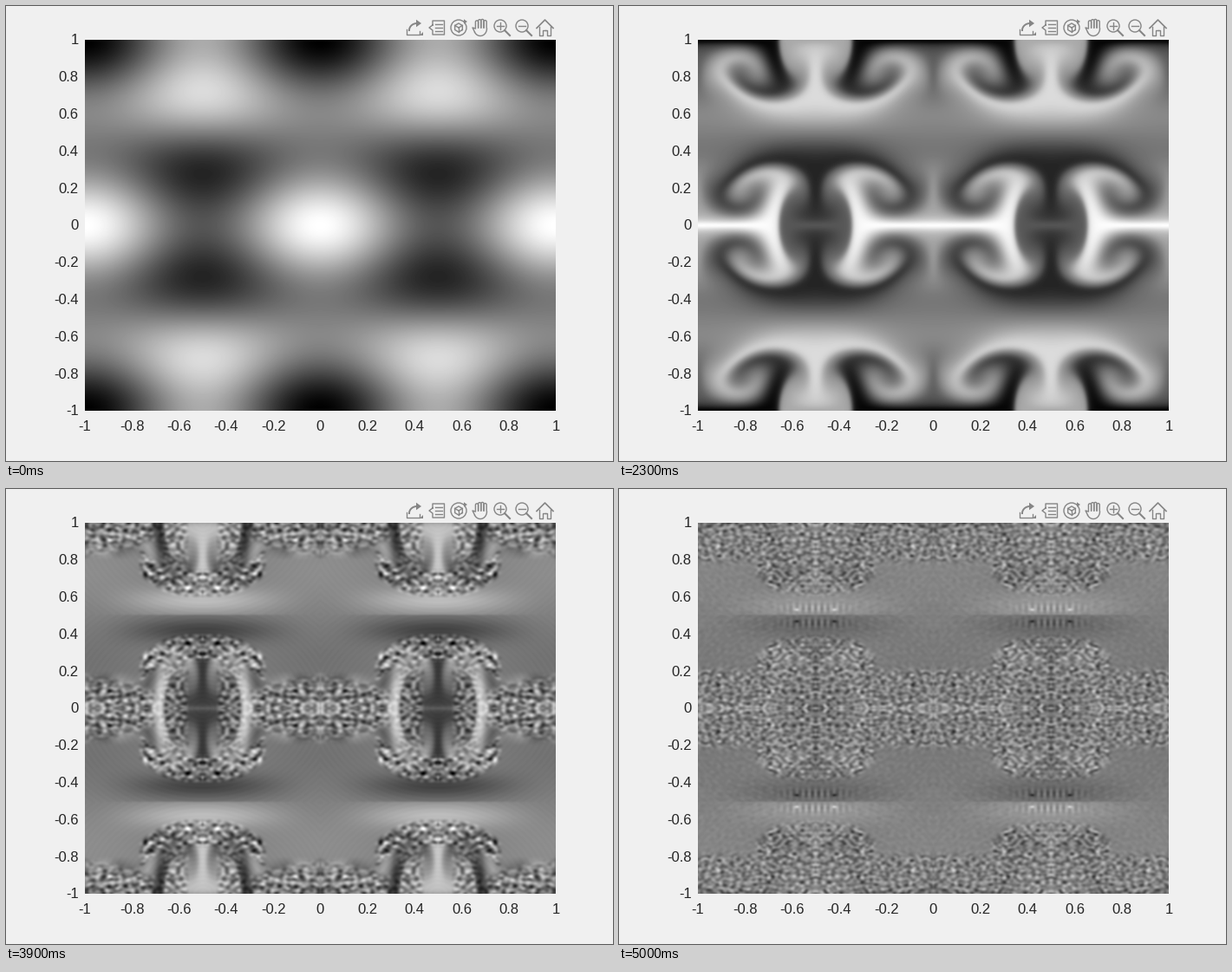
Recreate the animation shown at these times as a matplotlib script. Size 700 by 525 pixels, loop 5.1 s.

```python
import numpy as np
import matplotlib.pyplot as plt
from matplotlib.animation import FuncAnimation
from matplotlib.patches import Circle, Polygon

W, H, DPI = 700, 525, 100
FRAMES, INTERVAL = 51, 100
LEFT, RIGHT, TOP, BOTTOM = 91, 634, 39, 467
PAPER, INK, ICON = "#f0f0f0", "#262626", "#858585"
TAU = 2 * np.pi
CELLS = 64          # grid cells along one symmetric quarter of a period
RATE = 0.04         # strain per frame
REACH = 0.28        # height where the flow fades out

plt.rcParams["font.family"] = "Liberation Sans"

side = np.linspace(0, 0.5, CELLS + 1)
X, Y = np.meshgrid(side, side)


def ramp(n, start, end):
    return float(np.clip((n - start) / (end - start), 0, 1))


def smooth(a):
    return a * a * (3 - 2 * a)


def bump(d, width):
    return np.exp(-(d / width) ** 2)


def inside(d, soft=0.03):
    return np.clip(0.5 + d / soft, 0, 1)


# ---- transported field ----

def start_field(x, y):
    return (2 * np.cos(TAU * x) * np.cos(np.pi * y) + np.cos(3 * np.pi * y)) / 3


def velocity(x, y, time):
    """Curl of a few stream function modes, damped away from y = 0."""
    boost = 1 - smooth(ramp(time, 10, 20))
    rate = RATE / TAU * (1 - 0.7 * ramp(time, 30, 34))
    modes = ((1, 1, 1 + boost), (2, 1, 0.155), (2, 2, 0.422), (3, 1, -0.5))
    psi = u = v = 0
    for m, k, amp in modes:
        sx, cx = np.sin(TAU * m * x), np.cos(TAU * m * x)
        sy, cy = np.sin(TAU * k * y), np.cos(TAU * k * y)
        psi = psi + amp * sx * sy / TAU
        u = u + k * amp * sx * cy
        v = v - m * amp * cx * sy
    damp = 1 / (1 + (y / REACH) ** 6)
    slope = -6 * damp ** 2 * (y / REACH) ** 5 / REACH
    return rate * (u * damp + psi * slope), rate * v * damp


def transported(n):
    """Follow every grid point back to its starting place."""
    x, y = X, Y
    for step in range(n, 0, -1):
        u, v = velocity(x, y, step)
        u, v = velocity(x - u / 2, y - v / 2, step - 0.5)
        x, y = x - u, y - v
    return start_field(x, y)


# ---- turbulence ----

def blur(a, passes=1):
    for _ in range(passes):
        for axis in (0, 1):
            a = (np.roll(a, 1, axis) + 2 * a + np.roll(a, -1, axis)) / 4
    return a


def grain(rng, passes):
    a = blur(rng.standard_normal(X.shape), passes)
    a = a - blur(a, 3)
    return a / a.std()


rng = np.random.default_rng(7)
COARSE = [grain(rng, 2) for _ in range(2)]
FINE = [grain(rng, 1) for _ in range(2)]
CROWN = 0.39 - 0.1 * ((0.5 - X) / 0.25) ** 3
DOME = inside(CROWN - Y) * inside(X - 0.24)


def turbulence(n):
    late = ramp(n, 38, 45)
    phase = 0.8 * n
    wave = np.cos(phase), np.sin(phase)
    coarse = sum(w * a for w, a in zip(wave, COARSE))
    fine = sum(w * a for w, a in zip(wave, FINE))
    return ((1 - late) * coarse + late * fine) / np.hypot(1 - late, late)


def rough_zone(n):
    grow, late = ramp(n, 31, 39), ramp(n, 39, 50)
    height = 0.04 + 0.13 * grow + 0.04 * late - 0.25 * X * grow * (1 - late)
    tongue = inside(height - Y, 0.06) * inside(0.3 - X, 0.06)
    band = DOME * inside(Y - CROWN + 0.04 + 0.09 * grow)
    strip = inside(X - 0.33) * inside(0.43 + 0.06 * late - X) * inside(0.3 - Y)
    fill = DOME * ramp(n, 40, 48)
    zone = np.maximum.reduce([tongue, band, 0.8 * grow * strip, fill])
    return np.maximum(zone, 0.12 * late)


def quarter(n):
    value = transported(n)
    if n < 27:
        return value
    late, strength = ramp(n, 39, 50), ramp(n, 30, 37)
    zone = rough_zone(n)

    # calm surroundings that the field settles into
    across = np.sin(np.pi * X) ** 2
    calm = -0.6 * across * bump(Y - 0.42 - 0.03 * late, 0.07)
    calm = calm - 0.13 * (1 - across) * np.sin(TAU * Y)
    weight = ramp(n, 31, 39) * (1 - DOME) * inside(Y - 0.16, 0.08)
    value = value + (calm - value) * weight

    value = value * (1 - 0.2 * ramp(n, 32, 39) - 0.4 * late)
    value = value * (1 - 0.75 * strength * zone)
    value = value + strength * (0.33 - 0.1 * late) * zone * turbulence(n)
    rings = np.cos(270 * np.hypot(0.5 - X, Y))
    value = value + 0.02 * ramp(n, 27, 36) * rings
    bars = bump(Y - 0.46, 0.025) * bump(X - 0.5, 0.13) * np.cos(TAU * 38 * (X - 0.5))
    spot = bump(np.hypot(X - 0.42, Y - 0.468), 0.007)
    return value + 0.35 * late ** 3 * bars - late ** 6 * spot


def whole(q):
    """Even in x; odd about y = 0.5 and even about y = 0."""
    q = np.hstack([q, q[:, -2::-1]])
    q = np.hstack([q[:, :0:-1], q])
    q = np.vstack([q, -q[-2::-1]])
    return np.vstack([q[:0:-1], q])


# ---- stage ----

fig = plt.figure(figsize=(W / DPI, H / DPI), dpi=DPI, facecolor=PAPER)
stage = fig.add_axes([0, 0, 1, 1])
stage.set(xlim=(0, W), ylim=(H, 0))
stage.axis("off")

ax = fig.add_axes([LEFT / W, 1 - BOTTOM / H, (RIGHT - LEFT) / W, (BOTTOM - TOP) / H])
edge = 1 + 0.5 / (2 * CELLS)
image = ax.imshow(whole(quarter(0)), cmap="gray", vmin=-1, vmax=1, origin="lower",
                  extent=(-edge, edge, -edge, edge), aspect="auto",
                  interpolation="bicubic")
ax.set(xlim=(-1, 1), ylim=(-1, 1))
ax.axis("off")

for i in range(11):
    label = f"{(i - 5) / 5:g}"
    style = dict(fontsize=12, color=INK, va="center")
    stage.text(LEFT + i * (RIGHT - LEFT) / 10, 486, label, ha="center", **style)
    stage.text(83.5, BOTTOM + 0.8 - i * (BOTTOM - TOP) / 10, label, ha="right", **style)


# ---- toolbar ----

def line(xs, ys, width=1.0):
    stage.plot(xs, ys, color=ICON, lw=width, solid_joinstyle="round")


def ring(x, y, r):
    stage.add_patch(Circle((x, y), r, fill=False, ec=ICON, lw=1.0))


def arrow_tip(x, y, size):
    corners = [(x, y - size), (x + 1.4 * size, y), (x, y + size)]
    stage.add_patch(Polygon(corners, fc=ICON, ec="none"))


def arc(x, y, rx, ry, start, end):
    a = np.radians(np.linspace(start, end, 20))
    return x + rx * np.cos(a), y - ry * np.sin(a)


def export(x, y):
    line([x - 9, x - 9, x + 6, x + 6], [y + 2, y + 7.5, y + 7.5, y + 4])
    line(*arc(x + 3, y + 3, 9, 8, 180, 90), width=1.4)
    arrow_tip(x + 2, y - 5, 4.3)
    stage.add_patch(Polygon([(x + 6, y + 9), (x + 10, y + 9), (x + 10, y + 5)],
                            fc=ICON, ec="none"))


def data_tip(x, y):
    line([x - 5, x - 5, x + 8.5, x + 8.5, x - 5, x - 5, x - 9, x - 5],
         y + np.array([-3, -8, -8, 8, 8, 3, 0, -3]))
    for dy in (-4, 0, 4):
        line([x - 2, x + 6], [y + dy, y + dy])


def cube(x, y):
    ring(x, y, 9)
    a = np.pi / 6 + np.arange(7) * np.pi / 3
    xs, ys = x + 5 * np.cos(a), y + 5 * np.sin(a)
    line(xs, ys)
    for k in (1, 3, 5):
        line([x, xs[k]], [y, ys[k]])
    arrow_tip(x + 6, y - 7, 2.8)


def hand(x, y):
    for k in range(4):
        middle = x - 4 + 3.2 * k
        top = y - 8.5 + 1.2 * abs(k - 1.6)
        xs, ys = arc(middle, top, 1.6, 1.6, 180, 0)
        line([xs[0], *xs, xs[-1]], [y, *ys, y])
    line(*arc(x, y + 1, 7.5, 8.5, 0, -150))
    line([x - 6.5, x - 9, x - 5.6], [y + 5, y, y + 1])


def magnifier(x, y, plus):
    ring(x, y, 7)
    line([x + 5, x + 11], [y + 5, y + 11], width=1.5)
    line([x - 4, x + 4], [y, y])
    if plus:
        line([x, x], [y - 4, y + 4])


def home(x, y):
    line([x - 9.5, x, x + 9.5], [y, y - 9.5, y], width=1.2)
    for s in (-1, 1):
        line([x + s * 6.5, x + s * 6.5, x + s * 2.5, x + s * 2.5, x],
             [y - 2, y + 8.5, y + 8.5, y + 2.5, y + 2.5])


export(471, 25)
data_tip(497, 25)
cube(522, 25)
hand(547, 25)
magnifier(570, 23, True)
magnifier(595, 23, False)
home(621.5, 25.5)


def update(n):
    image.set_data(whole(quarter(n)))
    return (image,)


anim = FuncAnimation(fig, update, frames=FRAMES, interval=INTERVAL, repeat=True,
                     repeat_delay=0, blit=False)
plt.show()
```
